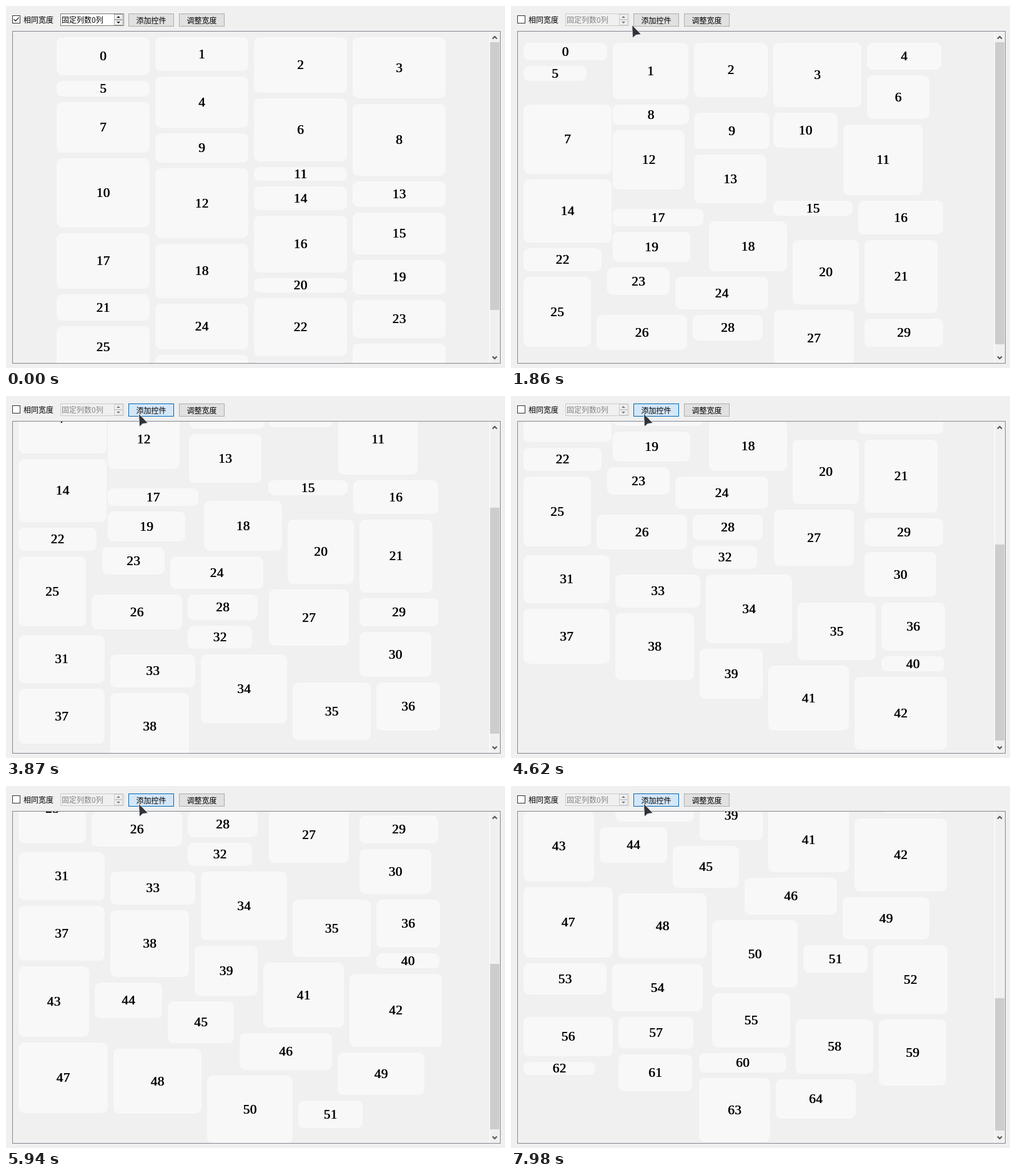
These frames come from a looping animation (799 px wide and 580 px high, 8 s). An HTML page:

```html
<!DOCTYPE html>
<html lang="zh">
<head>
<meta charset="utf-8">
<title>流式布局</title>
<style>
html, body { margin: 0; width: 100%; height: 100%; overflow: hidden; background: #f0f0f0; }
#stage { position: relative; width: 799px; height: 580px; overflow: hidden; background: #f0f0f0;
  font: 12px/20px "Noto Sans CJK SC", "Noto Sans CJK", sans-serif; color: #000; }
#stage * { position: absolute; box-sizing: border-box; white-space: nowrap; }
svg { fill: none; overflow: visible; }

.check { left: 10px; top: 15px; width: 13px; height: 13px; background: #fff; border: 1px solid #333;
  animation: check 8s infinite; }
.check svg { left: 0; top: 0; stroke: #222; stroke-width: 1.3; }
.free .check svg { display: none; }
.label { left: 28px; top: 12px; }
.spin { left: 87px; top: 12px; width: 102px; height: 20px; background: #fff; border: 1px solid #7a7a7a; }
.spin span { left: 1px; top: -1px; }
.spin i { right: 1px; width: 14px; height: 9px; background: #f0f0f0; border: 1px solid #acacac; }
.spin i:nth-of-type(1) { top: 0; }
.spin i:nth-of-type(2) { top: 9px; }
.spin svg { left: 3px; top: 2px; fill: #222; }
.free .spin { background: #f0f0f0; border-color: #ccc; color: #838383; }
.free .spin i { border-color: #ccc; }
.free .spin svg { fill: #777; }
.button { top: 12px; width: 73px; height: 21px; line-height: 20px; text-align: center;
  background: #e1e1e1; border: 1px solid #adadad; }
.add { left: 196px; animation: add 8s infinite; }
.adjust { left: 277px; }

.area { left: 10px; top: 40px; width: 782px; height: 533px; border: 1px solid #828790; }
.view { left: 0; top: 0; width: 763px; height: 531px; overflow: hidden; }
#cards { left: -11px; top: -41px; }
.card { background: #f8f8f8; border-radius: 9px; display: flex; align-items: center; justify-content: center;
  font: 21px "Liberation Serif", "Times New Roman", serif; letter-spacing: .5px; text-shadow: .8px 0 #000; }
.bar { left: 763px; top: 0; width: 17px; height: 531px; border-left: 1px solid #fff; }
.bar svg { left: 4px; stroke: #505050; stroke-width: 2; }
#thumb { left: 0; width: 15px; background: #cdcdcd; }

.cursor { left: 0; top: 0; animation: move 8s infinite; }
.cursor path { fill: #30343a; stroke: #f4f4f4; stroke-width: 1; }

@keyframes move {
  0%, 1.12% { opacity: 0; transform: translate(619px, 57px); }
  1.125% { opacity: 1; transform: translate(619px, 57px); animation-timing-function: ease-in-out; }
  10.875%, 16.5% { opacity: 1; transform: translate(17px, 22px); animation-timing-function: ease-in-out; }
  22.125%, 22.875% { transform: translate(190px, 30px); animation-timing-function: linear; }
  23.25% { transform: translate(193px, 30px); animation-timing-function: ease-out; }
  27.375%, 100% { opacity: 1; transform: translate(212px, 28px); }
}
@keyframes check {
  0%, 10% { background: #fff; border-color: #333; }
  10.8%, 13% { background: #fff; border-color: #0078d7; }
  13.2%, 13.9% { background: #cce4f7; border-color: #005499; }
  14%, 17.5% { background: #fff; border-color: #0078d7; }
  18.5%, 100% { background: #fff; border-color: #333; }
}
@keyframes add {
  0%, 23.5% { background: #e1e1e1; border-color: #adadad; }
  27.3%, 29% { background: #e5f1fb; border-color: #0078d7; }
  29.7% { background: #d3e7f8; border-color: #0066b4; }
  32%, 34.8% { background: #e5f1fb; border-color: #0078d7; }
  35.2% { background: #d9eaf9; border-color: #006cc0; }
  36.2%, 39.5% { background: #e2effa; border-color: #0078d7; }
  42%, 100% { background: #d3e7f8; border-color: #0066b4; }
}
</style>
</head>
<body>
<div id="stage">
  <div class="check"><svg width="11" height="11"><path d="M1.5 5.2 4.3 8 9.6 2.4"/></svg></div>
  <span class="label">相同宽度</span>
  <div class="spin"><span>固定列数0列</span>
    <i><svg width="6" height="3"><path d="M0 3 3 0 6 3z"/></svg></i>
    <i><svg width="6" height="3"><path d="M0 0 3 3 6 0z"/></svg></i>
  </div>
  <div class="button add">添加控件</div>
  <div class="button adjust">调整宽度</div>
  <div class="area">
    <div class="view"><div id="cards"></div></div>
    <div class="bar">
      <svg width="8" height="5" style="top:7px"><path d="M0 4.5 3.5 1 7 4.5"/></svg>
      <div id="thumb"></div>
      <svg width="8" height="5" style="top:520px"><path d="M0 .5 3.5 4 7 .5"/></svg>
    </div>
  </div>
  <svg class="cursor" width="18" height="24"><path d="M.5 0 1.5 21.5 7 16.5 15.5 15.5z"/></svg>
</div>
<script>
const LOOP = 8000, TOGGLE = 1120, GLIDE = 200, START_COUNT = 30;
const GAP = 9, TOP = 41, VIEW = 531, TRACK = 497;

// Card sizes in the free layout; positions follow from them
const sizes = [
  [134,28], [121,90], [118,87], [141,103], [119,43], [101,24], [100,70], [141,111], [122,32], [121,58],
  [103,56], [127,113], [115,95], [116,78], [141,101], [127,24], [136,54], [145,28], [125,80], [124,48],
  [106,103], [117,117], [125,37], [100,44], [149,52], [108,112], [145,56], [128,90], [112,41], [126,45],
  [115,72], [138,77], [103,37], [136,53], [138,110], [125,92], [102,77], [138,88], [126,107], [101,80],
  [101,24], [129,104], [148,117], [113,113], [108,57], [106,67], [148,59], [143,113], [141,104], [139,68],
  [137,108], [103,44], [119,110], [133,50], [145,76], [125,87], [143,63], [120,51], [124,87], [108,106],
  [140,31], [118,59], [115,21], [114,102], [128,63]
];

// Skyline packing: each card takes the highest spot it fits, leftmost on a tie
function pack(list) {
  const limit = 765;
  const line = [{ l: 20, r: limit + GAP, y: 59 }];
  const spot = (i, w) => {
    const x = line[i].l, right = x + w + GAP;
    let { y } = line[i], j = i;
    while (line[j].r < right && line[j + 1]) y = Math.max(y, line[++j].y);
    return { i, j, x, y, right };
  };
  return list.map(([w, h]) => {
    const { i, j, x, y, right } = line.map((_, k) => spot(k, w))
      .filter(s => s.x + w <= limit)
      .reduce((a, b) => (b.y < a.y ? b : a));
    const rest = line.slice(i, j + 1)
      .map(s => (x + w >= s.l ? { ...s, l: right } : s))
      .filter(s => s.r - s.l > GAP);
    line.splice(i, j - i + 1, { l: x, r: right, y: y + h + GAP }, ...rest);
    return [x, y, w, h];
  });
}

// Equal-width layout: random heights, each card goes to the shortest column
let seed = 1;
const rand = () => (seed = (Math.imul(seed, 214013) + 2531011) & 0x7fffffff) >> 16;
const tops = [50, 50, 50, 50];
const columns = Array.from({ length: START_COUNT }, () => {
  const h = 20 + rand() % 100;
  rand(); // the width draw is unused here
  const y = Math.min(...tops), c = tops.indexOf(y);
  tops[c] += h + GAP;
  return [81 + 158 * c, y, 149, h];
});

// Bursts of clicks: start, count, interval
const clicks = [
  [2400, 1, 0], [2815, 1, 0], [3180, 9, 110], [4350, 2, 135], [4670, 4, 85], [5160, 3, 210],
  [5825, 2, 105], [6100, 3, 190], [6570, 3, 100], [7050, 2, 120], [7500, 5, 112]
].flatMap(([start, count, step]) => Array.from({ length: count }, (_, i) => start + i * step));

const all = pack(sizes);
const added = all.slice(START_COUNT);
const columnBottom = Math.max(...tops);
const freeBottom = Math.max(...all.slice(0, START_COUNT).map(([, y, , h]) => y + h));
const ease = (a, b, p) => {
  const q = 1 - Math.min(1, Math.max(0, p));
  return b + (a - b) * q * q;
};

const $ = id => document.getElementById(id);
const stage = $('stage'), holder = $('cards'), thumb = $('thumb');
const cards = all.map((_, i) => {
  const el = document.createElement('div');
  el.className = 'card';
  el.textContent = i;
  return holder.appendChild(el);
});

function place(el, [x, y, w, h]) {
  Object.assign(el.style, { left: x + 'px', top: y + 'px', width: w + 'px', height: h + 'px' });
}

// Scroll position and lowest card edge at time t
function scrollAt(t) {
  let bottom = t < TOGGLE ? columnBottom : freeBottom;
  let from = 0, to = 0, start = 0;
  const at = time => ease(from, to, (time - start) / GLIDE);
  added.forEach(([, y, , h], i) => {
    if (clicks[i] > t) return;
    bottom = Math.max(bottom, y + h);
    const end = bottom - TOP + GAP - VIEW;
    if (end !== to) [from, to, start] = [at(clicks[i]), end, clicks[i]];
  });
  return { bottom, pos: Math.floor(at(t)) };
}

function draw(t) {
  stage.classList.toggle('free', t >= TOGGLE);
  const p = (t - TOGGLE) / GLIDE;
  all.forEach((box, i) => {
    const from = columns[i];
    place(cards[i], from ? box.map((v, k) => Math.round(ease(from[k], v, p))) : box);
    cards[i].style.display = from || t >= clicks[i - START_COUNT] ? '' : 'none';
  });
  const { bottom, pos } = scrollAt(t);
  const scale = TRACK / (bottom - TOP + GAP);
  holder.style.transform = `translateY(${-pos}px)`;
  thumb.style.top = Math.round(17 + pos * scale) + 'px';
  thumb.style.height = Math.floor(VIEW * scale) + 'px';
}

let origin;
function tick(now) {
  origin ??= now;
  draw((now - origin) % LOOP);
  requestAnimationFrame(tick);
}
draw(0);
requestAnimationFrame(tick);
</script>
</body>
</html>
```
